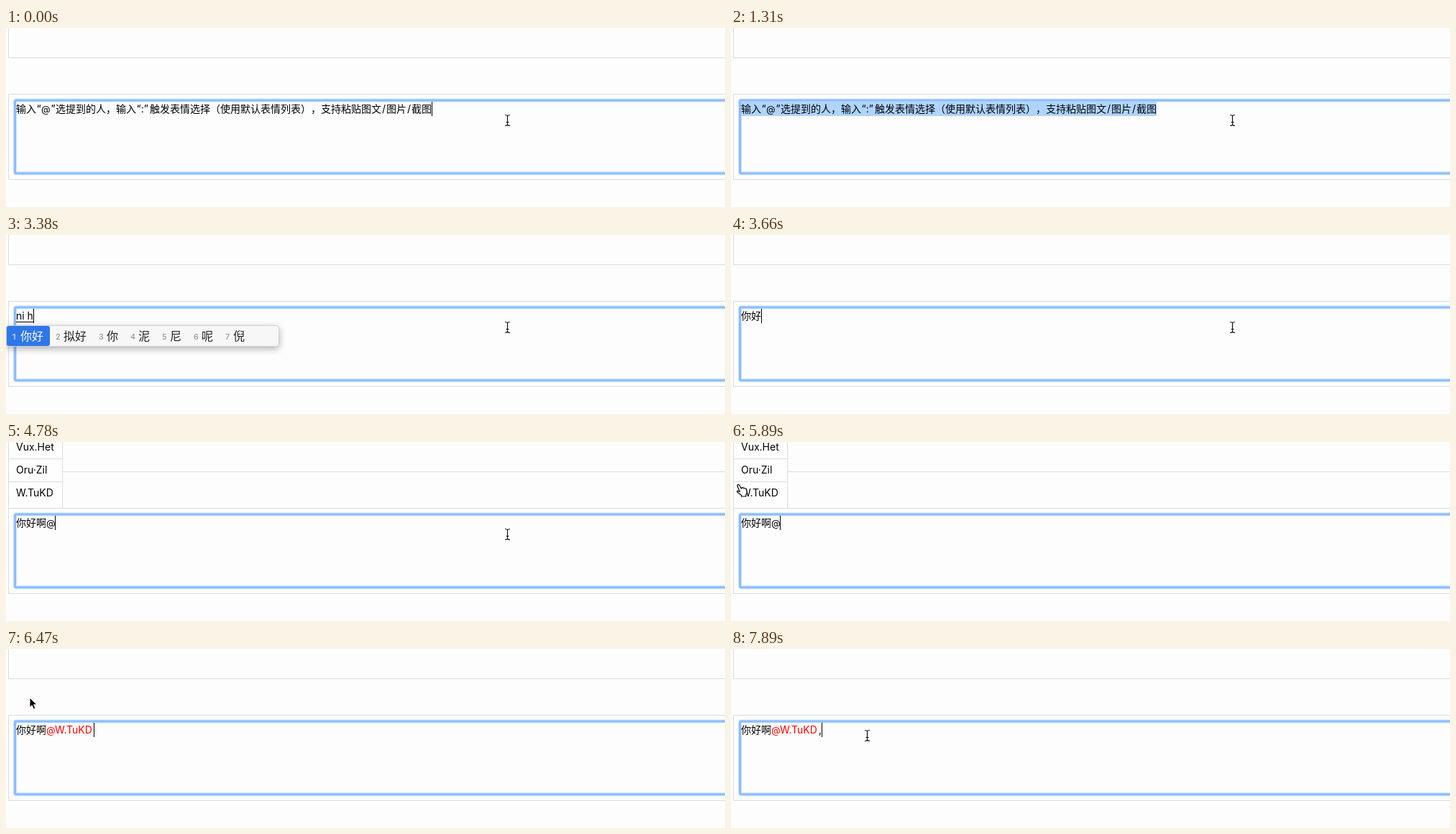
Animation of 1000 by 250 pixels, one loop 8 s. Source, as an HTML page:

```html
<!DOCTYPE html>
<html lang="zh-CN">
<head>
<meta charset="utf-8">
<title>编辑器演示</title>
<style>
  html, body { margin: 0; width: 100%; height: 100%; overflow: hidden; background: #fdfdfd; }
  svg { display: block; width: 1000px; height: 250px; }
  text { font: 14px "Noto Sans CJK SC", "Noto Sans CJK", sans-serif; white-space: pre; }
  .latin { font-family: Inter, "Noto Sans CJK SC", sans-serif; }
  .at { font-family: Inter, sans-serif; font-size: 13px; }
  .num { font: 11px Inter, sans-serif; }
  .cand { font-size: 16px; }
  .line { fill: none; stroke: #dcdcdc; }
  .panel { filter: drop-shadow(0 3px 5px rgba(0, 0, 0, .3)); }
</style>
</head>
<body>
<svg viewBox="0 0 1000 250">
  <rect class="line" x="3.5" y="-9.5" width="1100" height="51"/>
  <rect class="line" x="3.5" y="92.5" width="1100" height="119"/>
  <g id="ring" fill="none" stroke="#8cbdff">
    <rect x="12.5" y="101" width="1100" height="102" rx="2" stroke-width="5" opacity=".4"/>
    <rect x="12.5" y="101" width="1100" height="102" rx="1.5" stroke-width="3"/>
  </g>
  <g id="list">
    <path d="M3.5 -5V92.5H78.5V-5" fill="#fefefe" stroke="#dcdcdc"/>
    <path class="line" d="M4 23.5H78M4 55.5H78"/>
  </g>
  <rect id="selection" x="14" y="103" width="578" height="20" fill="#b0d4fe"/>
  <g id="content"></g>
  <g id="popups"></g>
  <rect id="caret" y="103" width="1" height="20"/>
  <g id="cursor">
    <g id="beam">
      <path d="M-3.5-7.5Q-.5-7.5 0-6Q.5-7.5 3.5-7.5M0-6V6M-3.5 7.5Q-.5 7.5 0 6Q.5 7.5 3.5 7.5M-2 2.5H2" fill="none" stroke="#fff" stroke-width="2.6"/>
      <path d="M-3.5-7.5Q-.5-7.5 0-6Q.5-7.5 3.5-7.5M0-6V6M-3.5 7.5Q-.5 7.5 0 6Q.5 7.5 3.5 7.5M-2 2.5H2" fill="none" stroke="#111" stroke-width="1.2"/>
    </g>
    <path id="arrow" d="M0 0V13.5L3-10.5 3 10.7 5.5 16 8 15 5.7 9.8H10Z" stroke="#fff" stroke-width="1"/>
    <path id="hand" d="M-2.3 1Q-1.6-1.2.6 0L3.4 5.2 3.8 3.8Q5.2 3 6.2 4.6Q7.6 3.6 8.6 5.2Q10 4.6 10.6 6.4L11.2 10Q11.2 12.4 9.8 13.6V16H3.4V14.4L-2 10.2Q-3.4 8.6-1.8 8.2L1.2 9.4Z" fill="#fff" stroke="#000" stroke-width="1.2" stroke-linejoin="round"/>
  </g>
</svg>
<script>
const LOOP = 8000, TICK = 57, BASE = 118;
const $ = id => document.getElementById(id);

function add(parent, tag, attrs, label) {
  const el = document.createElementNS("http://www.w3.org/2000/svg", tag);
  for (const k in attrs) el.setAttribute(k, attrs[k]);
  if (label) el.textContent = label;
  return parent.appendChild(el);
}

const put = (g, x, label, cls = "", fill = "#000", y = BASE) =>
  add(g, "text", { x, y, class: cls, fill }, label);

$("arrow").setAttribute("d", "M0 0V13.6L3.1 10.7 5.4 16 7.9 15 5.7 9.8H10Z");

// People in the mention list
const people = ["Vux.Het", "Oru·Zil", "W.TuKD"];
people.forEach((name, i) => put($("list"), 14, name, "latin", "#000", 12 + 32 * i));

// Editor contents: pieces of [x, text, class, colour]
const hello = [14, "你好"], helloA = [14, "你好啊"];
const mention = [[56, "@", "at", "#f00"], [68, people[2], "latin", "#f00"]];
const contents = {
  empty: [],
  hint: [
    [14, "输入"], [42.5, "“", "latin"], [49, "@", "at"], [62.5, "”", "latin"],
    [69, "选提到的人,".replace(",", "\uff0c")], [153, "输入"], [181.5, "“:”", "latin"],
    [200, "触发表情选择"], [284, "\uff08"], [298, "使用默认表情列表"], [410, "\uff09"],
    [424, "\uff0c"], [438, "支持粘贴图文"], [523, "/", "latin"], [529, "图片"],
    [558, "/", "latin"], [564, "截图"]
  ],
  hello: [hello],
  helloA: [helloA],
  at: [helloA, [56, "@", "at"]],
  named: [helloA, ...mention],
  comma: [helloA, ...mention, [122, ",", "latin"]]
};

function compose(key, label, x, end, before = []) {
  contents[key] = [...before, [x, label, "latin"]];
  contents[key].underline = [x, end];
}
compose("n", "n", 14, 22);
compose("ni", "ni", 14, 26);
compose("nih", "ni h", 14, 38);
compose("niha", "ni ha", 14, 46);
compose("nihao", "ni hao", 14, 54);
compose("a", "a", 42, 50, [hello]);

const groups = {};
for (const key in contents) {
  const g = groups[key] = add($("content"), "g", {});
  contents[key].forEach(p => put(g, ...p));
  const u = contents[key].underline;
  if (u) add(g, "path", { d: `M${u[0]} 121.5H${u[1]}`, stroke: "#000" });
}

// Input method candidate bars
function bar(x, width, words) {
  const g = add($("popups"), "g", {});
  add(g, "rect", { x: x + .5, y: 126.5, width, height: 29, rx: 4, fill: "#f7f7f7", stroke: "#d0d0d0", class: "panel" });
  let left = x + 1;
  words.split(" ").forEach((word, i) => {
    const w = 28 + 16 * word.length, ink = i ? "#222" : "#fff";
    if (!i) add(g, "rect", { x: left, y: 127, width: w, height: 28, rx: 3, fill: "#2f77e8" });
    put(g, left + 8, i + 1, "num", i ? "#888" : "#fff", 146);
    put(g, left + 19, word, "cand", ink, 147);
    left += w;
  });
  return g;
}
const bars = {
  short: bar(0, 243, "你 年 呢 能 那"),
  long: bar(0, 379, "你好 拟好 你 泥 尼 呢 倪"),
  a: bar(28, 230, "啊 阿 吖 呵 嗄")
};

// [time, content, caret x (0 = hidden), candidate bar]
const steps = [
  [0, "hint", 592], [350, "hint", 0], [830, "hint", 592], [1310, "hint", 0],
  [1840, "empty", 14], [2320, "empty", 0], [2860, "empty", 14],
  [3030, "n", 22], [3090, "n", 22, "short"], [3150, "ni", 26, "short"],
  [3320, "nih", 38, "long"], [3430, "niha", 46, "long"], [3490, "nihao", 54, "long"],
  [3660, "hello", 42], [3840, "a", 50], [3900, "a", 50, "a"],
  [4010, "helloA", 56], [4480, "helloA", 0],
  [4780, "at", 68], [5260, "at", 0], [5790, "at", 68], [6230, "at", 0],
  [6470, "named", 122], [6900, "named", 0], [7350, "named", 122], [7890, "comma", 126]
];

// Pointer path: [time, x, y]
const path = [
  [5320, 697.5, 129], [5890, 11, 60], [6000, 11, 60], [6118, 13, 68],
  [6289, 33, 68], [6470, 33, 68], [6916, 189.5, 121]
];

function pointer(t) {
  t = 5320 + Math.floor((t - 5320) / TICK) * TICK;
  const i = path.findIndex(p => p[0] > t);
  if (i === 0) return path[0].slice(1);
  if (i < 0) return path[path.length - 1].slice(1);
  const [a, b] = [path[i - 1], path[i]];
  const u = (t - a[0]) / (b[0] - a[0]), k = u * u * (3 - 2 * u);
  return [a[1] + (b[1] - a[1]) * k, a[2] + (b[2] - a[2]) * k];
}

const show = (el, on) => { el.style.display = on ? "" : "none"; };
const within = (t, a, b) => t >= a && t < b;

function draw(t) {
  const [, key, caret, popup] = steps.filter(s => s[0] <= t).pop();
  for (const k in groups) show(groups[k], k === key);
  for (const k in bars) show(bars[k], k === popup);
  show($("caret"), caret);
  $("caret").setAttribute("x", caret);
  show($("selection"), within(t, 1310, 1840));
  show($("ring"), !within(t, 6230, 6470));
  const open = within(t, 4780, 6470);
  show($("list"), open);

  const [x, y] = pointer(t);
  const kind = open && x < 79 && y < 92 ? "hand" : y > 98 && x > 10 ? "beam" : "arrow";
  ["hand", "beam", "arrow"].forEach(k => show($(k), k === kind));
  $("cursor").setAttribute("transform", `translate(${x.toFixed(1)} ${y.toFixed(1)})`);
}

const start = performance.now();
function tick() {
  draw((performance.now() - start) % LOOP);
  requestAnimationFrame(tick);
}
tick();
</script>
</body>
</html>
```
